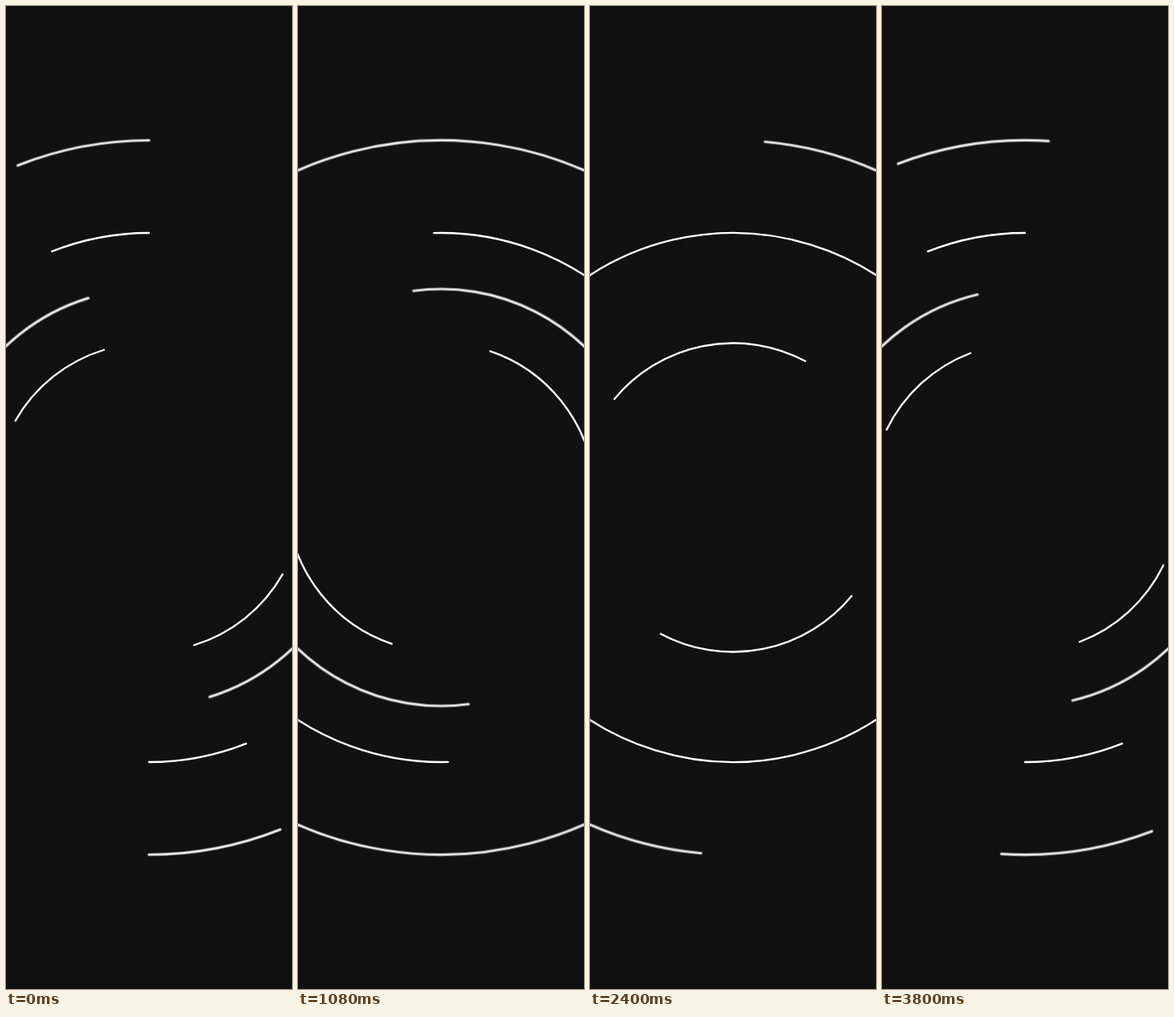
These frames come from a looping animation (350x1200 px, 3.84 s). An HTML page with a canvas:

```html
<!DOCTYPE html>
<html lang="en">
<head>
<meta charset="utf-8">
<title>Rings</title>
<style>
  html, body { margin: 0; width: 350px; height: 1200px; overflow: hidden; background: #111; }
  canvas { display: block; }
</style>
</head>
<body>
<canvas id="stage" width="350" height="1200"></canvas>
<script>
  const ctx = document.getElementById('stage').getContext('2d');
  const STEP = 40, STEPS = 96, PEAK = 52, LAST = 95;
  const RAD = Math.PI / 180;

  // Angles in degrees, clockwise from the top. head(p) is the clockwise end of the arc.
  const fullTurn = p => 360 * Math.min(p, LAST) / LAST;
  const shifted = p => -17 + 360 * p / STEPS;

  const rings = [
    { r: 436,   reverse: true,  soft: true,  min: 21.6, max: 180,  head: fullTurn },
    { r: 323,   reverse: false, soft: false, min: 21.6, max: 180,  head: fullTurn },
    { r: 254.5, reverse: true,  soft: true,  min: 43.2, max: 86.4, head: shifted },
    { r: 188.5, reverse: false, soft: false, min: 43.2, max: 86.4, head: shifted }
  ];

  // Arc length grows up to PEAK, shrinks until LAST, then rests.
  function arcLength(ring, p) {
    const k = p < PEAK ? p / PEAK : Math.max(0, (LAST - p) / (LAST - PEAK));
    return ring.min + (ring.max - ring.min) * k;
  }

  function strokeArc(r, from, to, width, color) {
    ctx.lineWidth = width;
    ctx.strokeStyle = color;
    for (const turn of [-90, 90]) {
      ctx.beginPath();
      ctx.arc(175, 600, r, (from + turn) * RAD, (to + turn) * RAD);
      ctx.stroke();
    }
  }

  function draw(time) {
    const n = Math.floor(time / STEP + 0.001) % STEPS;
    ctx.fillStyle = '#111';
    ctx.fillRect(0, 0, 350, 1200);
    ctx.lineCap = 'round';
    for (const ring of rings) {
      const p = ring.reverse ? STEPS - n : n;
      const to = ring.head(p);
      const from = to - arcLength(ring, p);
      if (ring.soft) {
        strokeArc(ring.r, from, to, 4.2, 'rgba(255,255,255,0.42)');
        strokeArc(ring.r, from, to, 2.2, 'rgba(255,255,255,0.85)');
      } else {
        strokeArc(ring.r, from, to, 2.3, '#fff');
      }
    }
  }

  function tick() {
    draw(performance.now());
    requestAnimationFrame(tick);
  }
  tick();
</script>
</body>
</html>
```
